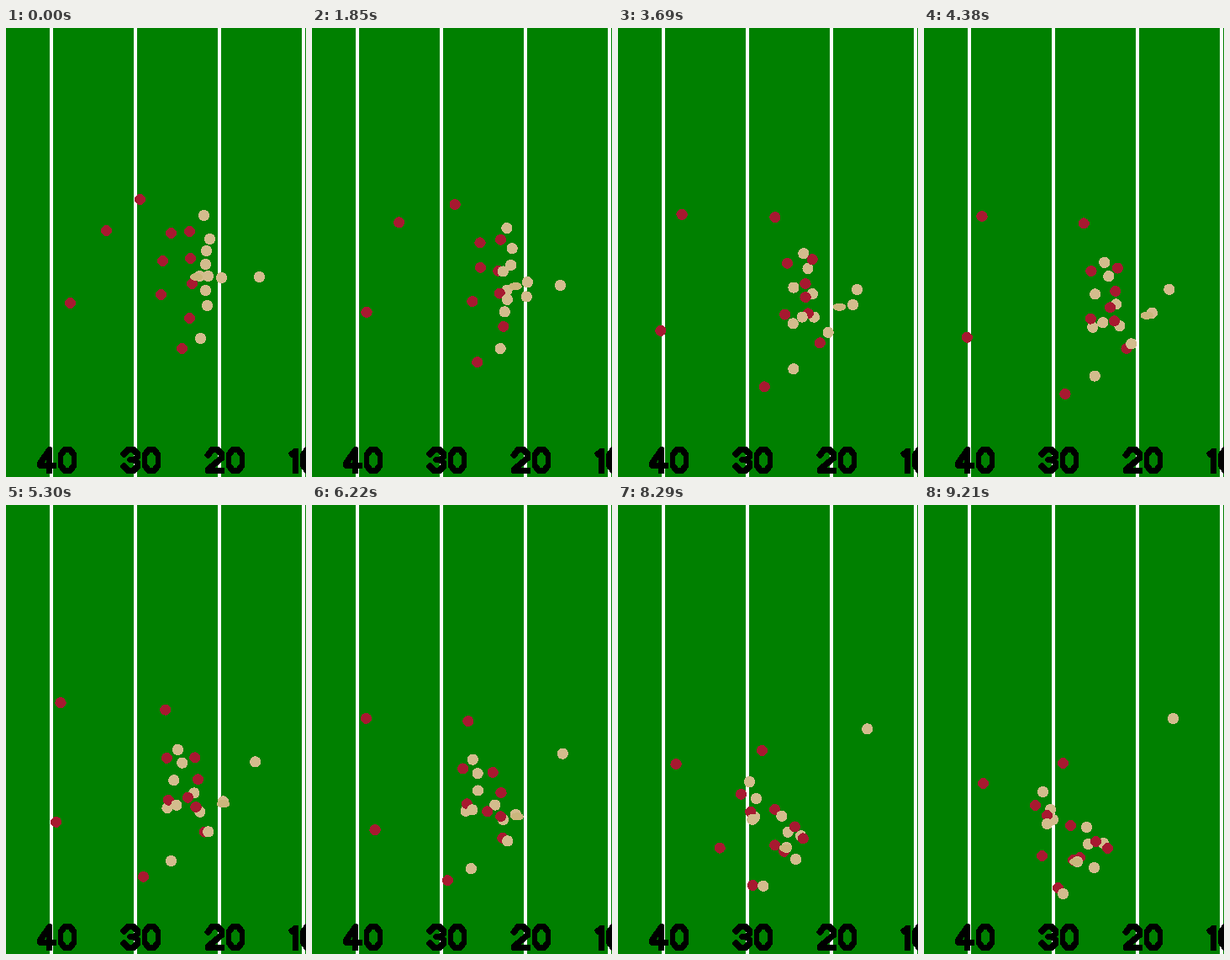
Animation, 357 px wide and 533 px high, one loop 9.44 s. Source, as a matplotlib script:

```python
import numpy as np
import matplotlib.pyplot as plt
from matplotlib.animation import FuncAnimation
from matplotlib.patches import Polygon, Rectangle

W, H, DPI = 357, 533, 64
LOOP_MS, TICK_MS, STEP_MS = 9440, 20, 230
STEPS = 41

GREEN, RED, TAN, LEATHER = "#008000", "#A71930", "#D3BC8D", "#CBB67C"

# Each path: start, halfway point, end
blockers = [
    [(235, 222), (212, 281), (141, 340)],
    [(242, 250), (217, 297), (150, 361)],
    [(238, 264), (227, 331), (195, 402)],
    [(230, 294), (232, 356), (213, 401)],
    [(239, 329), (198, 356), (153, 373)],
]
defenders = [
    [(159, 203), (190, 234), (165, 306)],
    [(119, 240), (67, 225), (70, 330)],
    [(76, 326), (52, 369), (140, 416)],
    [(209, 380), (166, 436), (159, 454)],
    [(196, 243), (197, 291), (132, 356)],
    [(218, 241), (229, 288), (174, 380)],
    [(219, 273), (220, 335), (177, 421)],
    [(186, 276), (228, 315), (204, 399)],
    [(221, 303), (226, 350), (218, 407)],
    [(184, 316), (197, 346), (146, 368)],
    [(218, 344), (240, 382), (185, 418)],
]
backs = [
    [(237, 280), (202, 318), (193, 382)],
    [(237, 311), (210, 351), (146, 378)],
    [(256, 296), (245, 378), (202, 430)],
    [(231, 368), (201, 415), (165, 461)],
    [(240, 294), (293, 309), (296, 253)],
    [(301, 295), (268, 341), (182, 423)],
]
ball = [[(226, 295), (264, 344), (180, 423)]]

# Centre lines of the digits in a unit box, y down
DIGITS = {
    "0": [(.5, 0), (.7, 0), (1, .25), (1, .75), (.7, 1), (.3, 1), (0, .75),
          (0, .25), (.3, 0), (.5, 0)],
    "1": [(0, .2), (.28, .06), (.28, 1)],
    "2": [(0, .25), (.3, 0), (.7, 0), (1, .2), (1, .4), (0, .94), (0, 1), (1, 1)],
    "3": [(0, .2), (.3, 0), (.7, 0), (1, .2), (1, .35), (.75, .48), (.45, .48),
          (.75, .48), (1, .62), (1, .8), (.7, 1), (.3, 1), (0, .8)],
    "4": [(1, .75), (0, .75), (0, .66), (.7, 0), (.7, 1)],
}


def hermite(u, p, q, m, n):
    """Cubic from p to q with end slopes m and n."""
    return ((2 * u**3 - 3 * u**2 + 1) * p + (3 * u**2 - 2 * u**3) * q
            + u * (1 - u)**2 * m + u**2 * (u - 1) * n)


def run(points):
    """Start from rest, sweep through the halfway point, keep speed at the end."""
    a, b, c = np.array(points, float) + 0.5
    u = np.linspace(0, 2, STEPS)[:, None]
    turn = (c - a) / 2
    return np.where(u < 1, hermite(u, a, b, 0, turn),
                    hermite(u - 1, b, c, turn, c - b))


def blob(rx, ry, power=2.0):
    """Outline of a superellipse; powers under 2 give pointed sides."""
    a = np.linspace(0, 2 * np.pi, 48, endpoint=False)
    c, s = np.cos(a), np.sin(a)
    return np.column_stack([rx * np.sign(c) * np.abs(c)**(2 / power),
                            ry * np.sign(s) * np.abs(s)**(2 / power)])


def write(text, x, y, w=16, h=25, weight=6):
    for ch in text:
        pts = np.array(DIGITS[ch])
        ax.plot(x + pts[:, 0] * w, y + pts[:, 1] * h, color="black",
                lw=weight * 72 / DPI, antialiased=False, zorder=2,
                solid_capstyle="projecting", solid_joinstyle="round")
        x += pts[:, 0].max() * w + 8.5


fig = plt.figure(figsize=(W / DPI, H / DPI), dpi=DPI, facecolor=GREEN)
ax = fig.add_axes([0, 0, 1, 1])
ax.axis("off")

for i in range(4):
    x = 54 + 100 * i
    ax.add_patch(Rectangle((x - 2, 0), 4, H, color="white", lw=0, zorder=1))
    write(str(40 - 10 * i), x - 13.5, 500.5)

ax.set_xlim(0, W)
ax.set_ylim(H, 0)

round_dot, pointed_dot = blob(6, 6, 1.9), blob(6.1, 6, 1.65)
layers = [
    (blockers, round_dot, TAN),
    (defenders, pointed_dot, RED),
    (backs, round_dot, TAN),
    (ball, blob(7, 4), LEATHER),
]

movers = []
for z, (paths, shape, color) in enumerate(layers, 3):
    for points in paths:
        patch = ax.add_patch(Polygon(shape, facecolor=color, edgecolor="none",
                                     lw=0, antialiased=False, zorder=z))
        movers.append((patch, shape, run(points)))


def update(n):
    step = min(n * TICK_MS // STEP_MS, STEPS - 1)
    for patch, shape, path in movers:
        patch.set_xy(shape + path[step])
    return [m[0] for m in movers]


anim = FuncAnimation(fig, update, frames=LOOP_MS // TICK_MS, interval=TICK_MS,
                     init_func=lambda: update(0), repeat=True, repeat_delay=0,
                     blit=False)
plt.show()
```
